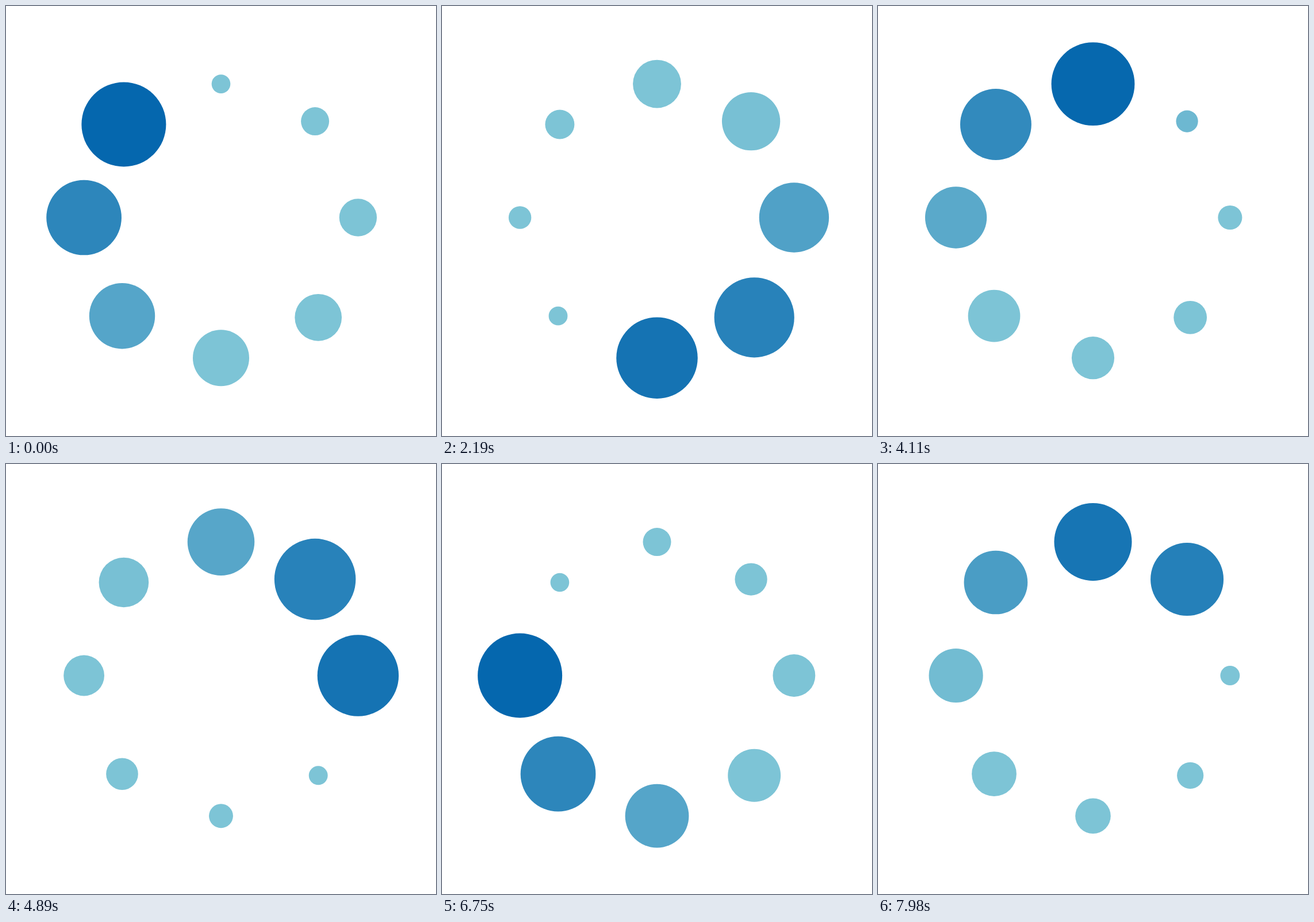
An HTML page for the animation above (8 s loop, 748 by 748 pixels).

```html
<!DOCTYPE html>
<html lang="en">
<head>
<meta charset="utf-8">
<title>Loading ring</title>
<style>
  html, body { margin: 0; width: 100%; height: 100%; overflow: hidden; background: #fff; }
  svg { display: block; width: 100%; height: 100%; }
</style>
</head>
<body>
<svg id="stage" viewBox="0 0 748 748"></svg>
<script>
const CLIP = 8000, TICK = 30, STEP = 450, COUNT = 8;
const UNIT = 8.17, MIN = 2 * UNIT, MAX = 9 * UNIT;
const DARK = [5, 103, 174], LIGHT = [125, 196, 214];

// Clockwise from the top
const centers = [
  [374, 135.6], [537.6, 200.6], [612.4, 368], [543.2, 541.8],
  [374, 612.2], [202, 539.2], [135.6, 368], [204.9, 206]
];

const dots = centers.map(([x, y]) => {
  const dot = document.createElementNS('http://www.w3.org/2000/svg', 'circle');
  dot.setAttribute('cx', x);
  dot.setAttribute('cy', y);
  return document.getElementById('stage').appendChild(dot);
});

const mix = (a, b, p) => a + (b - a) * p;
const linear = p => p;
const smooth = p => p * p * (3 - 2 * p);

// Cubic bezier with handles (1/6, 1/6) and (2/3, 1): linear start, soft landing
function softLanding(p) {
  const curve = (u, a, b) => 3 * (1 - u) ** 2 * u * a + 3 * (1 - u) * u * u * b + u ** 3;
  let low = 0, high = 1;
  for (let n = 0; n < 24; n++) {
    const mid = (low + high) / 2;
    if (curve(mid, 1 / 6, 2 / 3) < p) low = mid; else high = mid;
  }
  return curve(low, 1 / 6, 1);
}

// Shrink to the minimum until step i, swell for one step, then shrink back
function radius(i, step) {
  const rest = MIN + i * UNIT;
  const ease = i ? smooth : linear;
  if (step < i) return mix(rest, MIN, softLanding(step / i));
  if (step < i + 1) return mix(MIN, MAX, ease(step - i));
  return mix(MAX, rest, ease((step - i - 1) / (COUNT - 1 - i)));
}

// Fade over three steps after the peak, darken again in the step before it
function color(i, step) {
  const sincePeak = (step - i - 1 + COUNT) % COUNT;
  const ease = i ? linear : smooth;
  const fade = sincePeak < 7 ? Math.min(sincePeak / 3, 1) : COUNT - sincePeak;
  return `rgb(${DARK.map((c, n) => Math.round(mix(c, LIGHT[n], ease(fade))))})`;
}

function draw(now) {
  const time = Math.floor((now % CLIP) / TICK) * TICK;
  const step = (time / STEP) % COUNT;
  dots.forEach((dot, i) => {
    dot.setAttribute('r', radius(i, step));
    dot.setAttribute('fill', color(i, step));
  });
}

let start;
function loop(now) {
  start ??= now;
  draw(now - start);
  requestAnimationFrame(loop);
}
draw(0);
requestAnimationFrame(loop);
</script>
</body>
</html>
```
